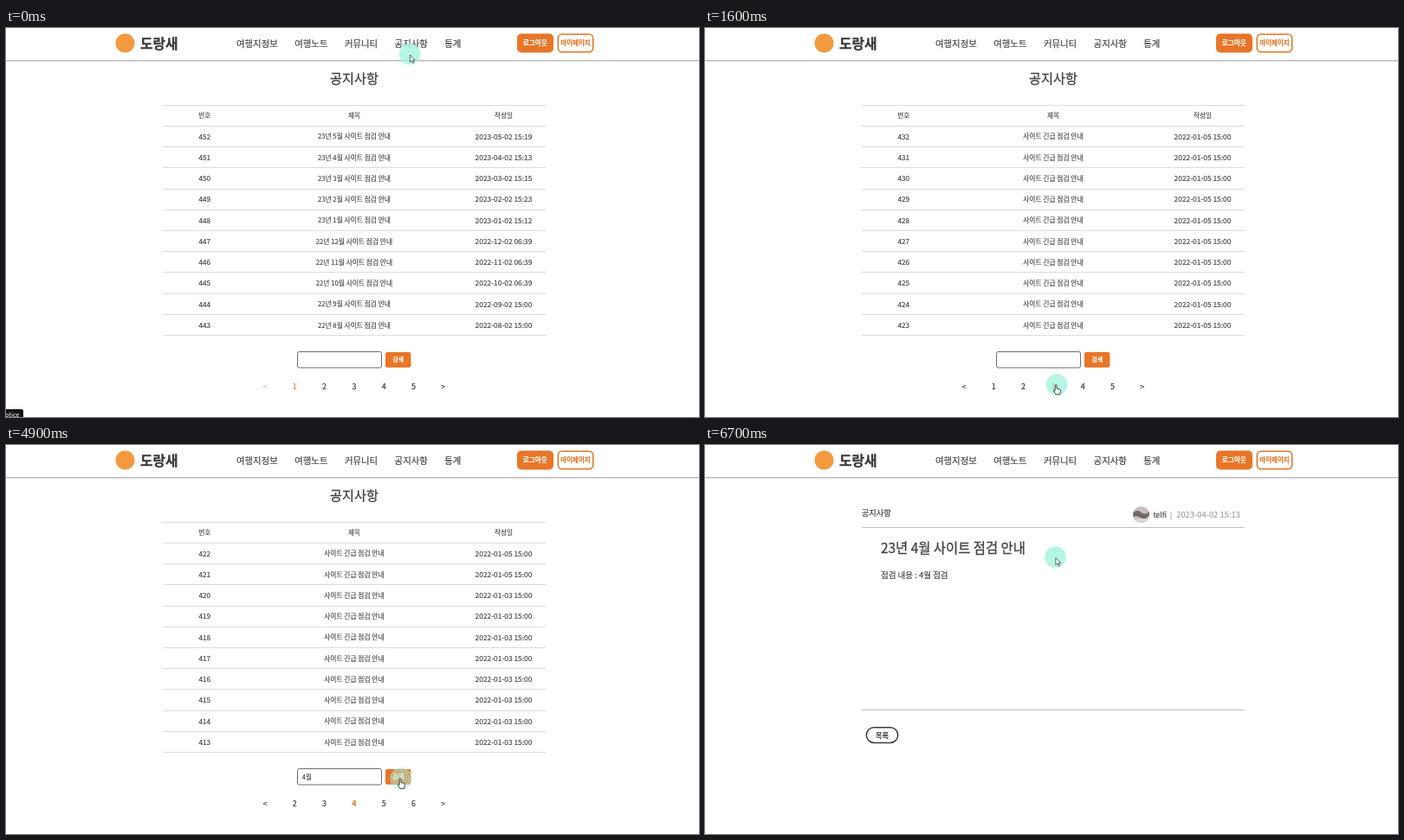
Animation of 800x450 px, one loop 6.8 s. Source, as an HTML page:

```html
<!DOCTYPE html>
<html>
<head>
<meta charset="utf-8">
<title>공지사항</title>
<style>
  html, body { margin: 0; width: 100%; height: 100%; overflow: hidden; background: #fff; }
  svg { display: block; width: 100vw; height: 100vh; }
  text { font-family: "Noto Sans CJK KR", "Noto Sans CJK", "Noto Sans", sans-serif; }
</style>
</head>
<body>
<svg id="stage" viewBox="0 0 800 450"></svg>
<script>
const LOOP = 6800, STEP = 100;
const INK = '#424047', ORANGE = '#e87628', PALE = '#c6c6c8';
const stage = document.getElementById('stage');

// The pointer eases from stop to stop; bend bows the way to the left.
const STOPS = [
  { from: 0, to: 0, x: 466, y: 30, shape: 'arrow' },
  { from: 0, to: 700, x: 367.5, y: 414, shape: 'hand' },
  { from: 1000, to: 1400, x: 406, y: 412.5, shape: 'hand' },
  { from: 1600, to: 2200, x: 446, y: 413.5, shape: 'hand' },
  { from: 2200, to: 2600, x: 380, y: 377, shape: 'beam' },
  { from: 2700, to: 3100, x: 452.5, y: 386, shape: 'hand' },
  { from: 4600, to: 4900, x: 456, y: 386, shape: 'hand' },
  { from: 5100, to: 5900, x: 416, y: 142, shape: 'hand', bend: 50 },
  { from: 5900, to: 6500, x: 404.5, y: 129.5, shape: 'arrow' }
];
const VIEWS = [[0, 1], [1000, 2], [1600, 3], [2100, 4], [5000, 'found'], [6100, 'detail']];
const FOCUS = 2400, TYPE = 3700, COMPOSE = 4000, BLUR = 4800;

const SHAPES = {
  arrow: '<path transform="translate(.4 1)" d="M0 0v8.4l2-1.8 1.4 3 1.3-.6-1.4-2.9h2.6z" fill="#fff" stroke="#444" stroke-width=".8" stroke-linejoin="round"/>',
  hand: '<path d="M-1.8.6q.9-1.2 1.8 0v3.9l3.4.9q1.2.4 1 2l-.6 4h-4.6l-2.7-4q-.3-1.5 1.7-.4z" fill="#fff" stroke="#333" stroke-width=".9" stroke-linejoin="round"/>',
  beam: '<path transform="translate(.6 1)" d="M-1.8-4q1.8 0 1.8 1.2q0-1.2 1.8-1.2M0-3v6M-1.8 4q1.8 0 1.8-1.2q0 1.2 1.8 1.2" fill="none" stroke="#444" stroke-width=".9"/>'
};

const pad = n => String(n).padStart(2, '0');
const count = (n, make) => Array.from({ length: n }, (_, i) => make(i));

// y is the middle of the line; a hairline outline gives a sturdier weight
function text(s, x, y, size, o = {}) {
  const { anchor = 'middle', fill = INK, weight = 400 } = o;
  return `<text x="${x}" y="${y + size * 0.38}" font-size="${size}" font-weight="${weight}" text-anchor="${anchor}" fill="${fill}" stroke="${fill}" stroke-width="${size * 0.018}">${s}</text>`;
}
function box(x, y, w, h, r, fill, stroke = 'none', sw = 1) {
  return `<rect x="${x}" y="${y}" width="${w}" height="${h}" rx="${r}" fill="${fill}" stroke="${stroke}" stroke-width="${sw}"/>`;
}
const rule = (y, color) => `<path d="M181 ${y}H623" stroke="${color}"/>`;

function header() {
  let x = 266, nav = '';
  for (const s of ['여행지정보', '여행노트', '커뮤니티', '공지사항', '통계']) {
    nav += text(s, x, 17.7, 10.4, { anchor: 'start' });
    x += s.length * 9.57 + 19.4;
  }
  return box(0, 37, 800, 1, 0, '#bdbabf') + box(0, 38, 800, 1, 0, '#dededf') +
    '<circle cx="137.5" cy="17.5" r="11" fill="#f3993f"/>' +
    text('도랑새', 155, 17.5, 15.8, { anchor: 'start', weight: 700, fill: '#3b3838' }) + nav +
    box(590, 6.5, 42, 22, 5, ORANGE) +
    text('로그아웃', 610.8, 17.5, 7.7, { fill: '#fff', weight: 700 }) +
    box(637.3, 7.3, 40.4, 20.5, 4.5, '#fff', ORANGE, 1.6) +
    text('마이페이지', 657.5, 17.5, 7.5, { fill: ORANGE, weight: 700 });
}

function notice(n) {
  if (n < 437) return { n, title: '사이트 긴급 점검 안내', date: `2022-01-${n > 420 ? '05' : '03'} 15:00` };
  const back = 452 - n, months = 2023 * 12 + 4 - back;
  const year = Math.floor(months / 12), month = months % 12 + 1;
  const clock = ['15:19', '15:13', '15:15', '15:23', '15:12'][back] || (n > 444 ? '06:39' : '15:00');
  return { n, title: `${year % 100}년 ${month}월 사이트 점검 안내`, date: `${year}-${pad(month)}-02 ${clock}` };
}

function table(ids) {
  const row = (i, size, cells) => cells.map((s, c) =>
    text(s, 229.3 + 172.6 * c, 101.2 + 24.24 * i, size[c])).join('');
  const lines = count(ids.length + 2, i => rule(Math.floor(89.3 + 24.2 * i) + 0.5, '#dcdcde'));
  const rows = ids.map(notice).map((r, i) => row(i + 1, [8.3, 7.75, 8.4], [r.n, r.title, r.date]));
  return text('공지사항', 402, 58.5, 15.2) + lines.join('') +
    row(0, [7.6, 7.6, 7.6], ['번호', '제목', '작성일']) + rows.join('');
}

function typedAt(t) {
  if (t < TYPE) return '';
  if (t < COMPOSE) return '4';
  return '4' + ['ㅇ', '워', '월'][Math.min(2, Math.floor((t - COMPOSE) / 100))];
}

function search(t) {
  const focus = t >= FOCUS + 100 && t < BLUR;
  const caret = t < TYPE ? Math.floor((t - FOCUS) / 500) % 2 === 0 : t < 4500;
  const typed = typedAt(t);
  let s = box(336.5, 374.5, 97, 18.5, 2, '#fff', focus ? '#222' : '#6c6c71', focus ? 1.7 : 1) +
    text(typed, 341.8, 383.8, 7.5, { anchor: 'start' }) +
    box(438, 375, 29.4, 17.8, 2, ORANGE) +
    text('검색', 452.7, 383.8, 7, { fill: '#fff', weight: 700 });
  if (focus && caret) s += box(342 + 5 * typed.length, 378.5, 0.8, 10.5, 0, '#555');
  return s;
}

function pager(view) {
  const found = view === 'found';
  const page = found ? 1 : view;
  const first = Math.max(1, page - 2);
  return ['&lt;', ...count(5, i => first + i), '&gt;'].map((s, i) => {
    const active = s === page;
    const off = found || (i === 0 && page === 1);
    return text(s, 299 + 34.3 * i, 414.5, 9, {
      fill: active ? ORANGE : off ? PALE : '#333', weight: active && page !== 1 || found && active ? 700 : 400
    });
  }).join('');
}

function detail() {
  const left = { anchor: 'start' };
  return text('공지사항', 180.7, 78.3, 9.3, left) +
    '<circle cx="503.5" cy="80.5" r="9.6" fill="#c9bdbd"/>' +
    '<path d="M494.5 78q5-4 9 0t9.2-1v5q-6 5-10 2t-8.5-1z" fill="#6f6a68"/>' +
    '<path d="M496 86.5q7-3 15 0a9.6 9.6 0 0 1-15 0z" fill="#dcd6d6"/>' +
    text('telfi', 517.5, 80.7, 8.6, left) +
    text('|', 538, 80.7, 8, { fill: '#999' }) +
    text('2023-04-02 15:13', 581, 80.7, 9.4, { fill: '#a09fa3' }) +
    rule(95.5, '#c2c2c4') +
    text('23년 4월 사이트 점검 안내', 203, 119.3, 15.4, left) +
    text('점검 내용 : 4월 점검', 203, 150.2, 9.5, left) +
    rule(306.5, '#c2c2c4') +
    box(186.3, 326.7, 36.4, 17.8, 8.9, '#fff', '#3d3c42', 1.5) +
    text('목록', 204.5, 335.8, 8.1, { weight: 700 });
}

function pointer(t) {
  const i = STOPS.filter(s => s.from <= t).length - 1;
  const b = STOPS[i], a = STOPS[i - 1];
  const u = Math.min(1, (t - b.from) / (b.to - b.from));
  const k = u * u * (3 - 2 * u);
  const x = a.x + (b.x - a.x) * k - (b.bend || 0) * Math.sin(Math.PI * k);
  const y = a.y + (b.y - a.y) * k;
  const shape = u < 0.15 ? a.shape : u < 0.9 ? 'arrow' : b.shape;
  const clicking = t >= BLUR && t < BLUR + 200;
  const spot = clicking
    ? '<circle r="12" fill="#a5f0de" opacity=".35"/>' +
      count(4, n => `<circle r="${4 + 2.7 * n}" fill="none" stroke="#a5f0de" opacity=".85"/>`).join('')
    : '<circle r="12.3" fill="#a3f4e0" opacity=".8"/>';
  return `<g transform="translate(${x} ${y})">${spot}${SHAPES[shape]}</g>`;
}

function draw(t) {
  const view = VIEWS.filter(v => v[0] <= t).pop()[1];
  let s = header();
  if (view === 'detail') {
    s += detail();
  } else {
    const ids = view === 'found' ? [451, 439] : count(10, i => 462 - 10 * view - i);
    s += table(ids) + search(t) + pager(view);
  }
  if (t < 300) {
    s += box(-4, 441, 24, 13, 2, '#111') + text('otice', -1, 447.3, 7.2, { anchor: 'start', fill: '#ddd' });
  }
  stage.innerHTML = s + pointer(t);
}

let shown = -1;
const start = performance.now();
function tick() {
  const t = Math.floor((performance.now() - start) % LOOP / STEP) * STEP;
  if (t !== shown) draw(shown = t);
  requestAnimationFrame(tick);
}
tick();
</script>
</body>
</html>
```
